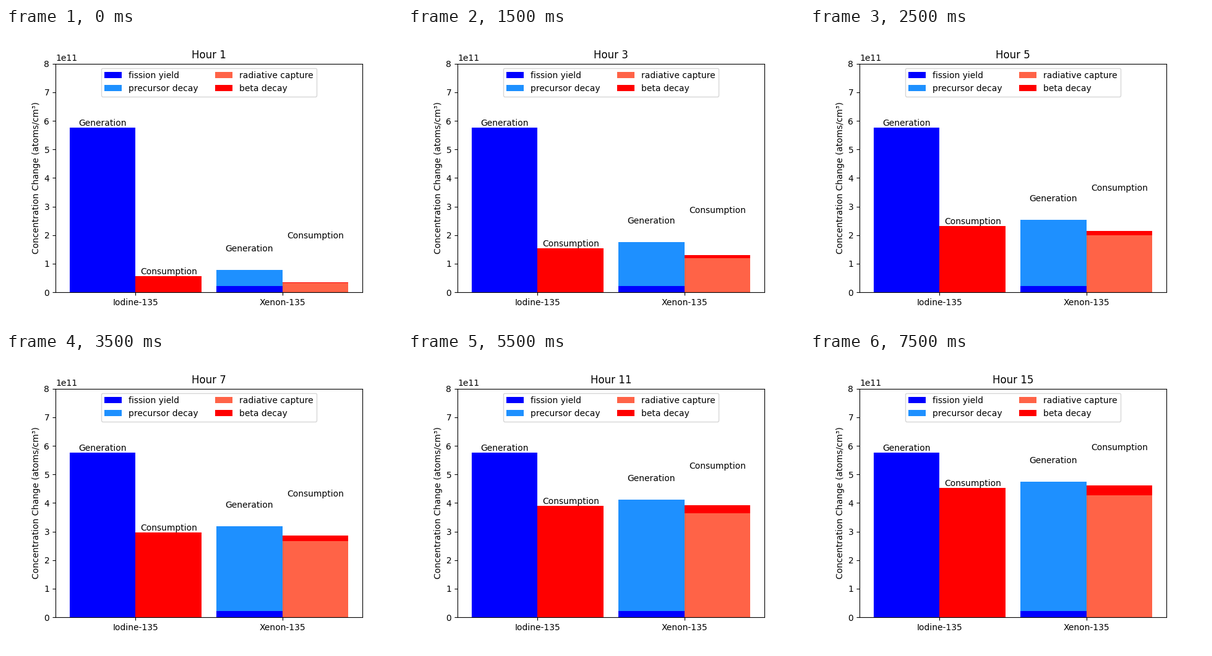
A matplotlib script for the animation above (8000 ms loop, 640x480 px).

```python
import numpy as np
import matplotlib.pyplot as plt
from matplotlib.animation import FuncAnimation

# Rates per hour and yields in atoms/cm³
UNIT = 1e11
IODINE_YIELD = 5.755 * UNIT
XENON_YIELD = 0.215 * UNIT
IODINE_DECAY = 0.1033
XENON_DECAY = 0.0753
XENON_LOSS = 1.03  # decay plus neutron capture

WIDTH = 0.45
FRAMES = 16

fig, ax = plt.subplots(figsize=(6.4, 4.8), dpi=100)


def iodine_consumption(hour):
    return IODINE_YIELD * (1 - np.exp(-IODINE_DECAY * hour))


def xenon_consumption(hour):
    """Capture and decay of xenon, both starting from a clean core."""
    slow = np.exp(-IODINE_DECAY * hour)
    fast = np.exp(-XENON_LOSS * hour)
    gain = XENON_LOSS / (XENON_LOSS - IODINE_DECAY)
    total = ((IODINE_YIELD + XENON_YIELD) * (1 - fast)
             - IODINE_YIELD * gain * (slow - fast))
    decay = total * XENON_DECAY / XENON_LOSS
    return total - decay, decay


def label(x, y, text):
    ax.text(x, y, text, ha="center", va="bottom")


def draw(frame):
    hour = max(1, frame)
    iodine = iodine_consumption(hour)
    capture, beta = xenon_consumption(hour)
    left = np.array([0, 1]) - WIDTH / 2
    right = left + WIDTH

    ax.clear()
    ax.bar(left, [IODINE_YIELD, XENON_YIELD], WIDTH,
           color="blue", label="fission yield")
    ax.bar(left[1], iodine, WIDTH, bottom=XENON_YIELD,
           color="dodgerblue", label="precursor decay")
    ax.bar(right[1], capture, WIDTH,
           color="tomato", label="radiative capture")
    ax.bar(right, [iodine, beta], WIDTH, bottom=[0, capture],
           color="red", label="beta decay")

    label(left[0], IODINE_YIELD, "Generation")
    label(right[0], iodine, "Consumption")
    label(left[1], iodine + 0.8 * UNIT, "Generation")
    label(right[1], capture + 1.5 * UNIT, "Consumption")

    ax.set_title(f"Hour {hour}")
    ax.set_ylabel("Concentration Change (atoms/cm³)")
    ax.set_xticks([0, 1], ["Iodine-135", "Xenon-135"])
    ax.set_ylim(0, 8 * UNIT)
    ax.legend(loc="upper center", ncol=2)


anim = FuncAnimation(fig, draw, frames=FRAMES, init_func=lambda: None,
                     interval=500, repeat=True, repeat_delay=0)
plt.show()
```
